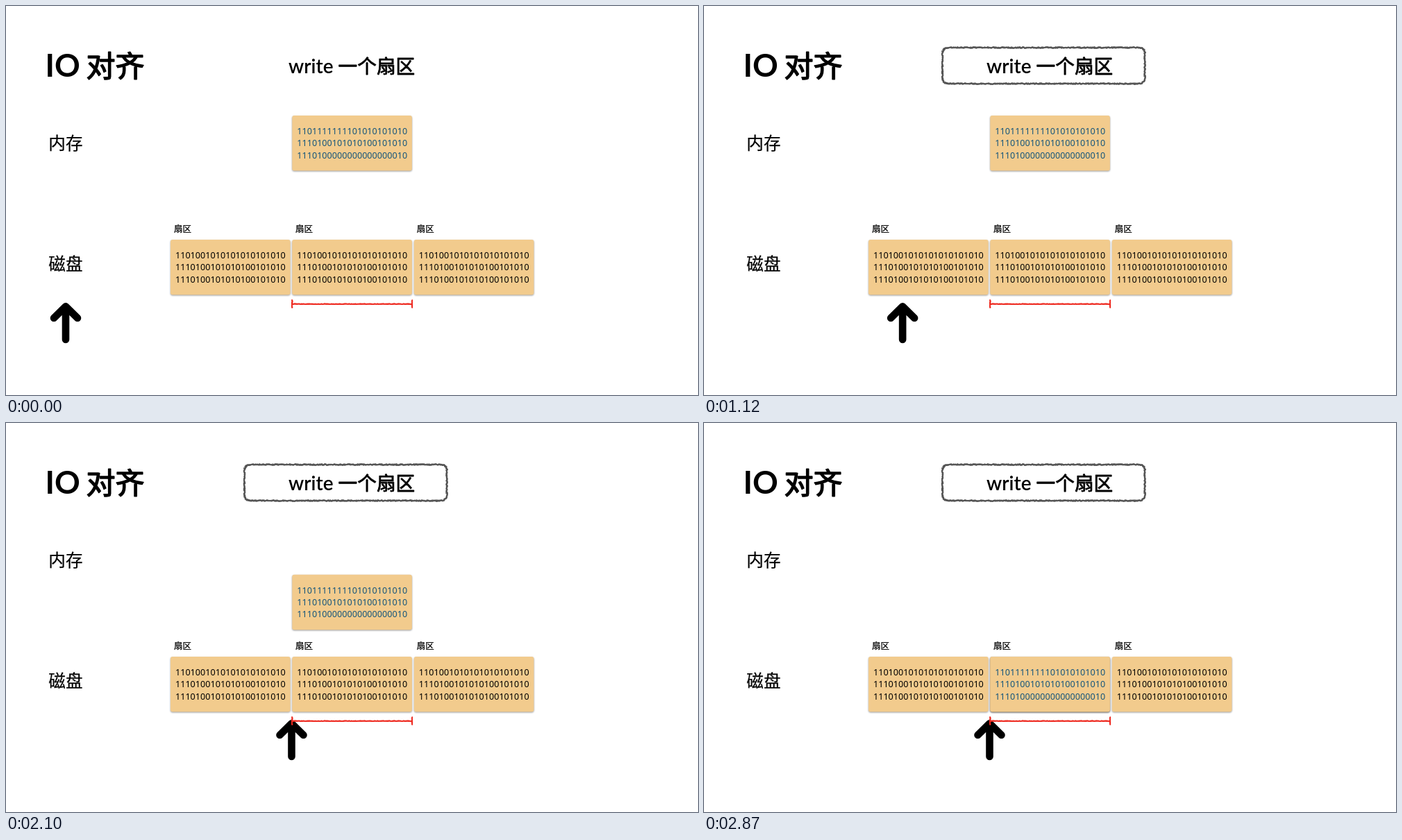
These frames come from a looping animation (997x561 px, 2940 ms). An HTML page:

```html
<!DOCTYPE html>
<html lang="zh-CN">
<head>
<meta charset="utf-8">
<title>IO 对齐</title>
<style>
  html, body { margin: 0; width: 100%; height: 100%; overflow: hidden; background: #fff; }
  svg { display: block; width: 997px; height: 561px; }
  text { font-family: "Noto Sans CJK SC", "Noto Sans CJK", sans-serif; }
  /* A thin outline gives the CJK text a medium weight. */
  .medium { stroke: #000; stroke-linejoin: round; }
  .latin { font-family: Lato, sans-serif; }
  .bits { font-family: "Noto Sans", sans-serif; font-size: 12.64px; text-anchor: middle; }
  .sector { fill: #f2cb8d; filter: drop-shadow(0 1px 1px rgba(0, 0, 0, .4)); }
  .rough { fill: none; stroke-linejoin: round; stroke-linecap: round; }
</style>
</head>
<body>
<svg viewBox="0 0 997 561">
  <text class="latin" x="56.6" y="102.4" font-size="45.5" font-weight="700">IO</text>
  <text class="medium" x="115.5" y="102" font-size="42" stroke-width="1.5">对齐</text>
  <g id="frame"></g>
  <text class="latin" x="407" y="96.5" font-size="28" font-weight="600">write</text>
  <text class="medium" x="478.5" y="96.5" font-size="27.7" stroke-width=".8">一个扇区</text>
  <g class="medium" font-size="24.6" stroke-width=".25">
    <text x="61.3" y="207">内存</text>
    <text x="61.3" y="381.3">磁盘</text>
  </g>
  <g id="disk"></g>
  <g id="memory"></g>
  <g class="medium" font-size="12.5" stroke-width=".25">
    <text x="242" y="326.3">扇区</text>
    <text x="417" y="326.3">扇区</text>
    <text x="591.8" y="326.3">扇区</text>
  </g>
  <path id="arrow" d="M86 481V433.3M69 450L86 433.3L103 450" fill="none" stroke="#000"
        stroke-width="10.6" stroke-linecap="round" stroke-linejoin="round"/>
  <g id="ruler"></g>
</svg>
<script>
const LOOP = 2940;
const STEP = 70;
const SVG = "http://www.w3.org/2000/svg";
const byId = id => document.getElementById(id);

function add(parent, tag, attributes, content = "") {
  const node = document.createElementNS(SVG, tag);
  for (const [name, value] of Object.entries(attributes)) node.setAttribute(name, value);
  node.textContent = content;
  parent.append(node);
  return node;
}

let seed = 7;
function random() {
  seed = (seed * 16807) % 2147483647;
  return seed / 2147483647;
}

function addSector(parent, x, y, rows, color) {
  add(parent, "rect", { class: "sector", x, y, width: 172.6, height: 79.5, rx: 3 });
  rows.forEach((row, i) =>
    add(parent, "text", { class: "bits", x: x + 86.4, y: y + 27.2 + i * 17.2, fill: color }, row));
}

// Overlapping jittered strokes give the look of a pencil line.
function addRough(parent, d, color, width, jitter) {
  const guide = add(parent, "path", { d, fill: "none" });
  const length = guide.getTotalLength();
  const wobble = () => (random() - .5) * 2 * jitter;
  for (let pass = 0; pass < 2; pass++) {
    const points = [];
    for (let s = 0; s <= length; s += 1.5) {
      const p = guide.getPointAtLength(s);
      points.push(`${(p.x + wobble()).toFixed(2)},${(p.y + wobble()).toFixed(2)}`);
    }
    add(parent, "polyline", { class: "rough", points: points.join(" "), stroke: color, "stroke-width": width });
  }
  guide.remove();
}

const stored = ["1101001010101010101010", "1110100101010100101010", "1110100101010100101010"];
const written = ["1101111111101010101010", "1110100101010100101010", "1110100000000000000010"];
for (const x of [237, 412.3, 587.9]) addSector(byId("disk"), x, 337, stored, "#000");
addSector(byId("memory"), 412.3, 158, written, "#14557c");

addRough(byId("frame"),
  "M353 60H626Q635.2 60 635.2 69V103Q635.2 112 626 112H353Q343.6 112 343.6 103V69Q343.6 60 353 60Z",
  "#555", 2.1, .8);
for (const d of ["M412.3 429.8H585", "M412.3 424.3V435.5", "M585 424.3V435.5"])
  addRough(byId("ruler"), d, "#ee2a20", 1.8, .4);

const progress = (t, start, duration) => Math.min(1, Math.max(0, (t - start) / duration));
const ease = u => (1 - Math.cos(Math.PI * u)) / 2;

function draw(now) {
  const t = Math.floor((now % LOOP) / STEP) * STEP;
  byId("frame").setAttribute("opacity", progress(t, 0, 510));
  byId("arrow").setAttribute("transform", `translate(${325.5 * ease(progress(t, 529, 1030))} 0)`);
  byId("memory").setAttribute("transform", `translate(0 ${179 * ease(progress(t, 1612, 1232))})`);
}

const origin = performance.now();
function tick() {
  draw(performance.now() - origin);
  requestAnimationFrame(tick);
}
tick();
</script>
</body>
</html>
```
